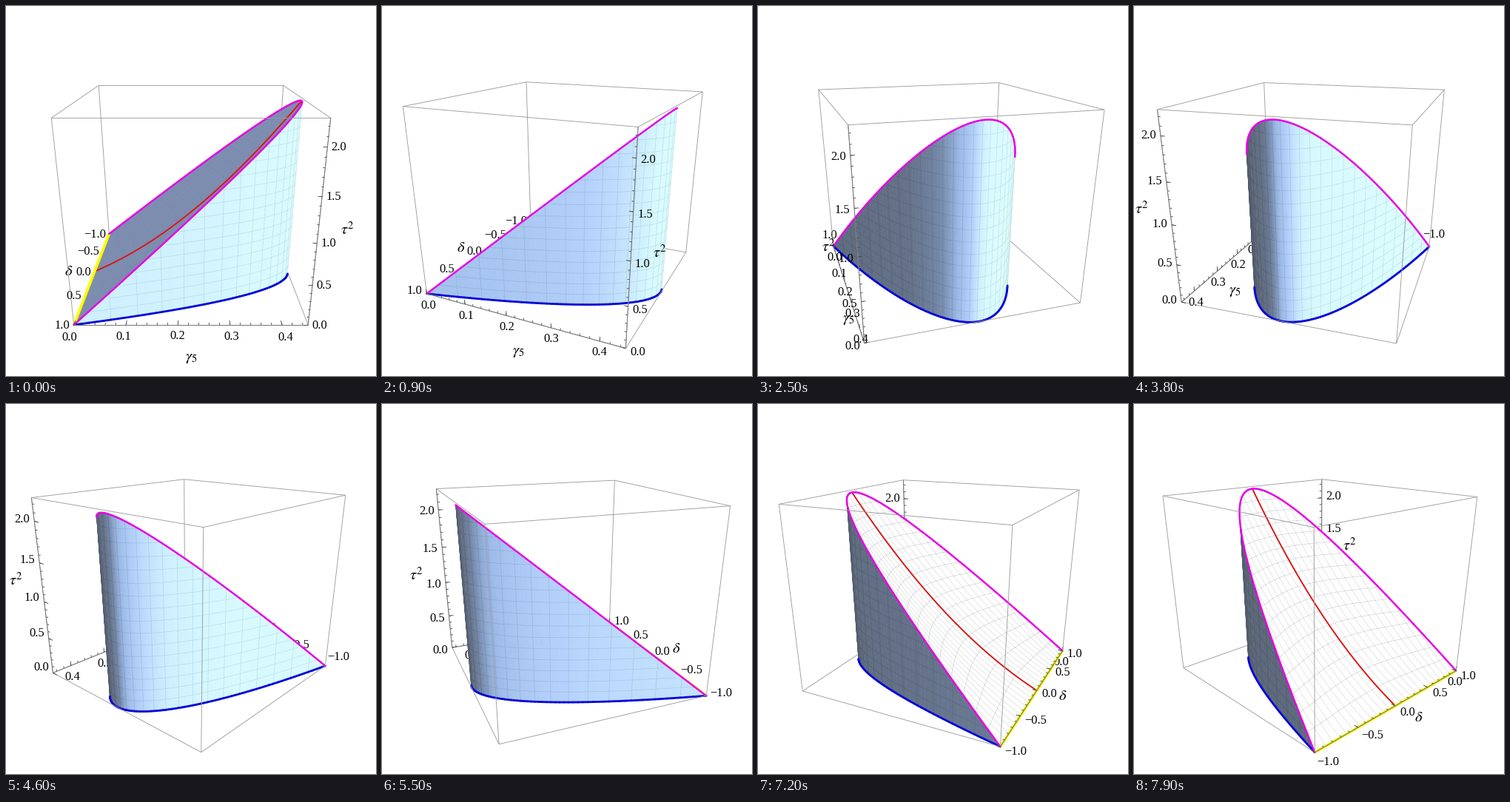
Write a matplotlib script that moves like this. It is 500 px wide and 500 px high and loops after 8 s.

```python
import numpy as np
import matplotlib as mpl
import matplotlib.pyplot as plt
from matplotlib.animation import FuncAnimation
from matplotlib.collections import LineCollection, PolyCollection

mpl.rcParams["font.family"] = "Liberation Serif"
mpl.rcParams["mathtext.fontset"] = "stix"

SIZE, STEPS, TURN = 500, 80, 0.05      # stage, frames per loop, radians per frame
PX = 0.72                              # points per pixel at 100 dpi
CAM_R, CAM_Z = 4.63, 1.72              # camera in box units
G_MAX, T_MAX = 0.45, 2.27              # axis ranges of gamma and tau^2
X_TIP, Z_TIP, SAG = 0.997, 0.975, 0.48
GREY, DARK = (0.61,) * 3, (0.3,) * 3
MAGENTA, BLUE, RED, YELLOW = "#e800e4", "#0808d8", "#dc1414", "#ffff00"

# wall colour against the angle between its normal and the viewer (degrees)
SHADE_AT = [-75, -45, -32, -18, 0, 15, 28, 90]
SHADE = np.array([(88, 99, 116), (100, 113, 136), (116, 136, 168), (154, 184, 230),
                  (181, 210, 252), (206, 240, 255), (215, 250, 255), (222, 255, 255)]) / 255

fig = plt.figure(figsize=(5, 5), dpi=100, facecolor="white")
ax = fig.add_axes([0, 0, 1, 1])


def spin(x, d, th):
    return x * np.cos(th) - d * np.sin(th), -x * np.sin(th) - d * np.cos(th)


def proj(x, d, z, th):
    """Perspective view of box coordinates in [-1, 1], as pixels."""
    x, d, z = np.broadcast_arrays(*(np.asarray(v, float) for v in (x, d, z)))
    u, depth = spin(x, d, th)
    den = 0.007166 + 0.001357 * depth - 0.00051 * z
    return np.stack([250 + u / den, 250 - (0.833 * z + 0.31 * depth) / den], -1)


def box_x(g):
    return -1 + (1 + X_TIP) * g


def box_z(t):
    return -1 + (1 + Z_TIP) * t


def roof(g, d):
    """Height of the upper surface, 0..1."""
    return g * (1 - SAG * (1 - d * d - g))


def roof_level(t, d):
    """Where the upper surface reaches height t."""
    b = 1 - SAG * (1 - d * d)
    return (-b + np.sqrt(b * b + 4 * SAG * t)) / (2 * SAG)


def lines(segs, color, width, z, **kw):
    if len(segs):
        ax.add_collection(LineCollection(segs, colors=color, linewidths=width * PX,
                                         zorder=z, **kw), autolim=False)


def pairs(pts):
    return np.stack([pts[:-1], pts[1:]], 1)


D = np.linspace(-1, 1, 126)
G = 1 - D ** 2
DM = (D[1:] + D[:-1]) / 2
LEVELS = np.arange(1, 16) / 16


def draw_box(th, cx, cd):
    seen = {(0, 1): cx > 1, (0, -1): cx < -1, (1, 1): cd > 1, (1, -1): cd < -1,
            (2, 1): True, (2, -1): False}
    back, front = [], []
    for axis in range(3):
        others = [i for i in range(3) if i != axis]
        for s in (-1, 1):
            for r in (-1, 1):
                a = np.zeros(3)
                a[others] = s, r
                b = a.copy()
                a[axis], b[axis] = -1, 1
                near = seen[others[0], s] or seen[others[1], r]
                (front if near else back).append([proj(*a, th), proj(*b, th)])
    lines(back, [GREY], 0.9, 1)
    lines(front, [GREY], 0.9, 20)


def heading(p, out, th):
    v = proj(*(p + 0.001 * out), th) - proj(*p, th)
    return v / np.hypot(*v)


def draw_axis(th, base, axis, out, scale, major, minor, name, gap, front):
    """Ticks, numbers and name along one box edge."""
    z = 21 if front else 2
    base, out = np.array(base, float), np.array(out, float)

    def at(v):
        p = base.copy()
        p[axis] = scale(v)
        return p

    ticks = []
    for vals, size in ((minor, 3), (major, 6)):
        for v in vals:
            p = at(v)
            q = proj(*p, th)
            ticks.append([q, q - size * heading(p, out, th)])
    lines(ticks, [DARK], 0.9, z)
    a, b = base.copy(), base.copy()
    a[axis], b[axis] = -1, 1
    lines([[proj(*a, th), proj(*b, th)]], [(0.45,) * 3], 0.9, z)

    for v in major:
        p = at(v)
        way = heading(p, out, th)
        half = 14 if v < 0 else 10
        x, y = proj(*p, th) + way * (5.3 + half * abs(way[0]) + 8.5 * abs(way[1]))
        ax.text(x, y + 5, f"{v:.1f}".replace("-", "\u2212"), size=16.5 * PX,
                ha="center", va="baseline", zorder=z)
    mid = base.copy()
    mid[axis] = 0
    x, y = proj(*mid, th) + gap * heading(mid, out, th)
    ax.text(x, y + 5.5, name, size=20.5 * PX, ha="center", va="baseline", zorder=z)


def draw_axes(th, cx, cd, step):
    c, s = np.cos(th), np.sin(th)
    draw_axis(th, (0, 1, -1), 0, (0, 1, 0) if step < 3 else (0, 0, -1),
              lambda v: 2 * v / G_MAX - 1, np.arange(5) / 10, np.arange(23) / 50,
              r"$\gamma_5$", 43, cd > 1)
    draw_axis(th, (-1, 0, -1), 1, (-1, 0, 0), lambda v: v,
              np.arange(-2, 3) / 2, np.arange(-10, 11) / 10,
              r"$\delta$", 35.5, cx < -1)
    draw_axis(th, (1, 1, 0), 2, (1, 0, 0) if abs(c) > abs(s) else (0, 1, 0),
              lambda v: 2 * v / T_MAX - 1, np.arange(5) / 2, np.arange(23) / 10,
              r"$\tau^2$", 39, cx > 1 or cd > 1)


def draw_roof(th, dark):
    rim = proj(box_x(G), D, box_z(G), th)
    fill = (0.495, 0.555, 0.69) if dark else (0.995,) * 3
    ax.add_collection(PolyCollection([rim], facecolors=[fill], edgecolors="none",
                                     zorder=4), autolim=False)
    mesh = []
    for d in np.arange(-0.96, 0.97, 0.08):
        g = np.linspace(0, 1 - d * d, 24)
        mesh.append(proj(box_x(g), d, box_z(roof(g, d)), th))
    rows = []
    for t in LEVELS:
        w = np.sqrt(1 - t)
        d = np.linspace(-w, w, 40)
        rows.append(proj(box_x(roof_level(t, d)), d, box_z(t), th))
    lines(mesh, [(0.2, 0.25, 0.3, 0.04 if dark else 0.17)], 0.7, 5)
    lines(rows, [(0.2, 0.25, 0.3, 0.04 if dark else 0.22)], 0.7, 5)
    g = np.linspace(0, 1, 50)
    lines([proj(box_x(g), 0, box_z(roof(g, 0)), th)], [RED], 1.9, 6)


def draw_wall(th, cx, cd, roof_seen):
    gm = 1 - DM ** 2
    nd = 2 * (1 + X_TIP) * DM
    near = (cx - box_x(gm)) + nd * (cd - DM) > 0
    nx, ny = spin(1, nd, th)
    beta = np.degrees(np.arctan2(nx, -ny))
    color = np.stack([np.interp(beta, SHADE_AT, ch) for ch in SHADE.T], 1)

    low, top = proj(box_x(G), D, -1, th), proj(box_x(G), D, box_z(G), th)
    quads = np.stack([low[:-1], low[1:], top[1:], top[:-1]], 1)
    if near.any():
        ax.add_collection(PolyCollection(quads[near], facecolors=color[near],
                                         edgecolors=color[near], linewidths=0.4,
                                         zorder=8), autolim=False)
    segs, tint = [], []
    for i in range(4, len(D) - 1, 4):
        if near[i]:
            segs.append([low[i], top[i]])
            tint.append(color[i])
    for t in LEVELS:
        keep = near & (np.minimum(G[1:], G[:-1]) >= t)
        row = pairs(proj(box_x(G), D, box_z(t), th))
        segs.extend(row[keep])
        tint.extend(color[keep])
    if segs:
        lines(np.array(segs), np.array(tint) * 0.89, 0.7, 9)

    lines(pairs(low)[near], [BLUE], 2.8, 10, capstyle="round")
    shown = near | roof_seen
    lines(pairs(top)[shown], [MAGENTA], 2.4, 13, capstyle="round")


def update(step):
    ax.cla()
    ax.set(xlim=(0, SIZE), ylim=(SIZE, 0))
    ax.axis("off")
    th = step * TURN
    cx, cd = CAM_R * np.sin(th), CAM_R * np.cos(th)
    roof_seen = CAM_Z > box_z((1 + cx) / 2)
    draw_box(th, cx, cd)
    draw_axes(th, cx, cd, step)
    if roof_seen:
        draw_roof(th, dark=step < STEPS // 2)
    lines([proj(-1, np.array([-1, 1]), -1, th)], [YELLOW], 3.8, 12 if roof_seen else 7)
    draw_wall(th, cx, cd, roof_seen)
    return []


anim = FuncAnimation(fig, update, frames=STEPS, interval=100, repeat=True,
                     repeat_delay=0, init_func=lambda: [], blit=False)
plt.show()
```
